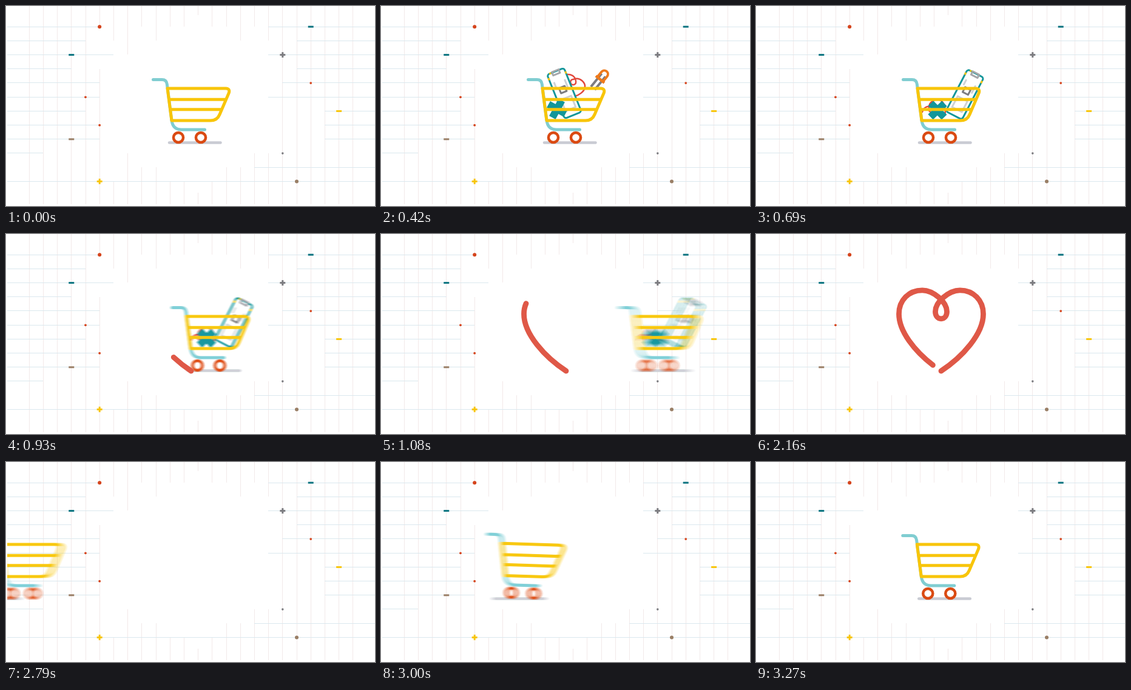
Write an HTML page with a canvas that moves like this. It is 608 px wide and 330 px high and loops after 3600 ms.

```html
<!DOCTYPE html>
<html lang="en">
<head>
<meta charset="utf-8">
<title>Cart and heart</title>
<style>
html, body { margin: 0; width: 100%; height: 100%; overflow: hidden; background: #fff; }
canvas { display: block; }
</style>
</head>
<body>
<canvas id="stage" width="608" height="330"></canvas>
<script>
const W = 608, H = 330, LOOP = 3600, CELL = 23.2;
const RED = '#d5441c', TEAL = '#0c7480', YELLOW = '#f8c50a', GREY = '#7c7c80', BROWN = '#9a7f66';
const ctx = document.getElementById('stage').getContext('2d');

const clamp01 = v => Math.max(0, Math.min(1, v));
const span = (t, from, to) => clamp01((t - from) / (to - from));

function makeLayer() {
  const c = document.createElement('canvas');
  c.width = W;
  c.height = H;
  return c.getContext('2d');
}

function stroke(g, d, color, width, cap = 'round') {
  g.strokeStyle = color;
  g.lineWidth = width;
  g.lineCap = cap;
  g.lineJoin = 'round';
  g.stroke(new Path2D(d));
}

function disc(g, x, y, r, color) {
  g.fillStyle = color;
  g.beginPath();
  g.arc(x, y, r, 0, 7);
  g.fill();
}

// ---- Background grid ----
const col = k => 38.2 + CELL * k;
const row = k => 34 + CELL * k;

// For each row: where the left part ends and the right part begins.
const rowGaps = [[154, 432], [131, 479], [177, 432], [108, 479], [154, 455], [154, 432],
  [131, 525], [154, 525], [154, 525], [61, W], [2, 409], [304, 304]];
// For columns 5 to 17: where the top part ends and the bottom part begins.
const colGaps = [[34, 104], [57, 289], [80, 243], [34, 266], [57, 266], [34, 289], [34, 289],
  [15, 308], [34, 289], [34, 266], [57, 266], [34, 243], [57, 243]];

function drawBackground(g) {
  g.fillStyle = '#fff';
  g.fillRect(0, 0, W, H);
  g.fillStyle = '#f2e9e9';
  for (let k = 0; k < 24; k++) {
    const [top, bottom] = colGaps[k - 5] || [150, 150];
    const x = Math.floor(col(k));
    g.fillRect(x, 0, 1, top);
    g.fillRect(x, bottom, 1, 327 - bottom);
  }
  g.fillStyle = '#dae8ee';
  rowGaps.forEach(([left, right], k) => {
    const y = Math.floor(row(k));
    g.fillRect(2, y, left - 2, 1);
    g.fillRect(right, y, W - right, 1);
  });

  const dash = (c, r, color) => {
    g.fillStyle = color;
    g.fillRect(col(c) - 4.5, row(r) - 1.3, 9, 3);
  };
  const plus = (c, r, color) => {
    dash(c, r, color);
    g.fillRect(col(c) - 1.5, row(r) - 4.3, 3, 9);
  };
  const dot = (c, r, radius, color) => disc(g, col(c), row(r) + .3, radius, color);
  dot(5, 0, 3, RED);
  dash(20, 0, TEAL);
  dash(3, 2, TEAL);
  plus(18, 2, GREY);
  dot(20, 4, 1.9, RED);
  dot(4, 5, 1.9, RED);
  dash(22, 6, YELLOW);
  dot(5, 7, 1.9, RED);
  dash(3, 8, BROWN);
  dot(18, 9, 1.8, GREY);
  plus(5, 11, YELLOW);
  dot(19, 11, 3, BROWN);
}

// ---- Goods: drawn around their own centre, posed by [time, x, y, angle] keys ----
function drawPlug(g) {
  stroke(g, 'M-4 -9V19M4 -9V19', GREY, 4, 'butt');
  stroke(g, 'M-6 0V-11A6 6 0 0 1 6 -11V0', '#ee7a1c', 4);
  stroke(g, 'M-9 0H9', '#ee7a1c', 4.5, 'butt');
}

function drawCord(g) {
  stroke(g, 'M-15 -19C-5 -20 0 -12 -1 -5A4.5 4.5 0 1 1 -5 -11C6 -16 15 -5 14 2C13 9 5 15 -3 17', '#e2483c', 2.5);
}

function drawBoard(g) {
  g.fillStyle = '#fff';
  g.beginPath();
  g.roundRect(-15, -39, 30, 78, 4);
  g.fill();
  g.strokeStyle = '#12969a';
  g.lineWidth = 3;
  g.stroke();
  stroke(g, 'M-15 -33V-29M15 -33V-29M-11 -39H-8', YELLOW, 3, 'butt');
  stroke(g, 'M-6 -40H6V-34H-6Z', '#a5a7aa', 3);
  stroke(g, 'M-5 -11H5V-2H-5Z', GREY, 3);
  stroke(g, 'M-9 -22V-14M9 -20V-8M-9 8H9V28H-9Z', '#cfd1d4', 3);
}

function drawCross(g) {
  g.fillStyle = '#12969a';
  g.fillRect(-16, -6, 32, 12);
  g.fillRect(-6, -16, 12, 32);
}

const goods = [
  { draw: drawPlug, keys: [[240, 372, -40, .9], [420, 361, 121, .68], [600, 339, 152, .49]] },
  { draw: drawCord, keys: [[210, 330, -40, -.6], [420, 322, 132, 0], [600, 297, 168, -1.2]] },
  { draw: drawBoard, keys: [[150, 306, -45, -.1], [400, 302, 144, -.38], [440, 302, 144, -.38], [630, 344, 146, .48]] },
  { draw: drawCross, keys: [[120, 296, -40, -.6], [370, 290, 170, .5], [440, 290, 170, .5], [630, 299, 172, .8]] },
];

function drawGoods(g, t) {
  for (const { draw, keys } of goods) {
    if (t < keys[0][0]) continue;
    let i = 0;
    while (i < keys.length - 2 && t >= keys[i + 1][0]) i++;
    const from = keys[i], to = keys[i + 1];
    const p = span(t, from[0], to[0]);
    const eased = i ? p * p * (3 - 2 * p) : p ** 1.5;
    const [, x, y, angle] = from.map((v, j) => v + (to[j] - v) * eased);
    g.save();
    g.translate(x, y);
    g.rotate(angle);
    draw(g);
    g.restore();
  }
}

// ---- Cart ----
function drawCart(g, t, tilt, dip, shadowShift) {
  stroke(g, `M${269 + shadowShift} 225.5H${353.5 + shadowShift}`, '#c9cbd3', 4.5);
  g.save();
  g.translate(321, 228);
  g.rotate(tilt);
  g.translate(-321, -228 + dip);
  if (t < 1300) drawGoods(g, t);
  stroke(g, 'M242.5 121.5H257Q264.5 121.5 265.3 129L273 189Q275 204 289 204H327.5', '#80cdd1', 5);
  stroke(g, 'M266 136H362Q370 136.500 367 144L352 179Q348 189 337 189H273ZM269 154.300H362M271 170.800H355', YELLOW, 5);
  for (const x of [284, 321]) {
    disc(g, x, 217, 10.3, '#da4a12');
    disc(g, x, 217, 5.8, '#fff');
  }
  g.restore();
}

function cartX(t) {
  if (t < 660) return 0;
  if (t < 2000) return 31 * ((t - 660) / 270) ** 3.6;
  return -385 * (1 - span(t, 2700, 3120)) ** 1.365 - .7;
}

const sprite = makeLayer();
const blurred = makeLayer();
const SAMPLES = 8, SHUTTER = 15;

function drawMovingCart(t) {
  if (t > 1230 && t < 2715) return;
  const x = cartX(t);
  const entering = t > 2000;
  const tilt = entering ? .095 * Math.sin(Math.PI * span(t, 2970, 3255)) : 0;
  const dip = 1.2 * Math.sin(Math.PI * span(t, 430, 600));
  const shadowShift = entering ? .2 * (x + .7) : 0;
  const blur = cartX(t + SHUTTER / 2) - cartX(t - SHUTTER / 2);

  ctx.save();
  ctx.beginPath();
  ctx.rect(2, 0, W - 2, H);
  ctx.clip();
  if (blur < 1) {
    ctx.translate(x, 0);
    drawCart(ctx, t, tilt, dip, shadowShift);
  } else {
    sprite.clearRect(0, 0, W, H);
    drawCart(sprite, t, tilt, dip, 0);
    // The lagging shadow lies on its own strip below the wheels.
    if (shadowShift) {
      sprite.clearRect(0, 0, W, H);
      sprite.save();
      sprite.translate(60, 0);
      drawCart(sprite, t, tilt, dip, shadowShift);
      sprite.restore();
    }
    const origin = shadowShift ? x - 60 : x;
    blurred.clearRect(0, 0, W, H);
    blurred.globalCompositeOperation = 'lighter';
    blurred.globalAlpha = 1 / SAMPLES;
    for (let i = 0; i < SAMPLES; i++) {
      blurred.drawImage(sprite.canvas, origin + blur * ((i + .5) / SAMPLES - .5), 0);
    }
    ctx.drawImage(blurred.canvas, 0, 0);
  }
  ctx.restore();
}

// ---- Heart ----
const heartData = 'M305 226C270 203 235.500 165 235.500 132C235.500 109 252 92.800 274 92.800' +
  'C292 92.800 314.500 112 314.500 128C314.500 135 310.500 139.800 305 139.800' +
  'C299.500 139.800 295.500 135 295.500 128C295.500 112 318 92.800 336 92.800' +
  'C358 92.800 374.500 109 374.500 132C374.500 165 340 203 305 226';
const heartNode = document.createElementNS('http://www.w3.org/2000/svg', 'path');
heartNode.setAttribute('d', heartData);
const heartLength = heartNode.getTotalLength();

function drawHeart(t) {
  const head = span(t, 810, 1410) ** 1.65 * heartLength;
  const tail = span(t, 2130, 2670) ** 1.2 * heartLength;
  if (head - tail < .1) return;
  ctx.setLineDash([head - tail, heartLength * 2]);
  ctx.lineDashOffset = -tail;
  stroke(ctx, heartData, '#df5847', 8.8);
  ctx.setLineDash([]);
}

const background = makeLayer();
drawBackground(background);

function frame(now) {
  const t = now % LOOP;
  ctx.drawImage(background.canvas, 0, 0);
  drawMovingCart(t);
  drawHeart(t);
  requestAnimationFrame(frame);
}
requestAnimationFrame(frame);
</script>
</body>
</html>
```
